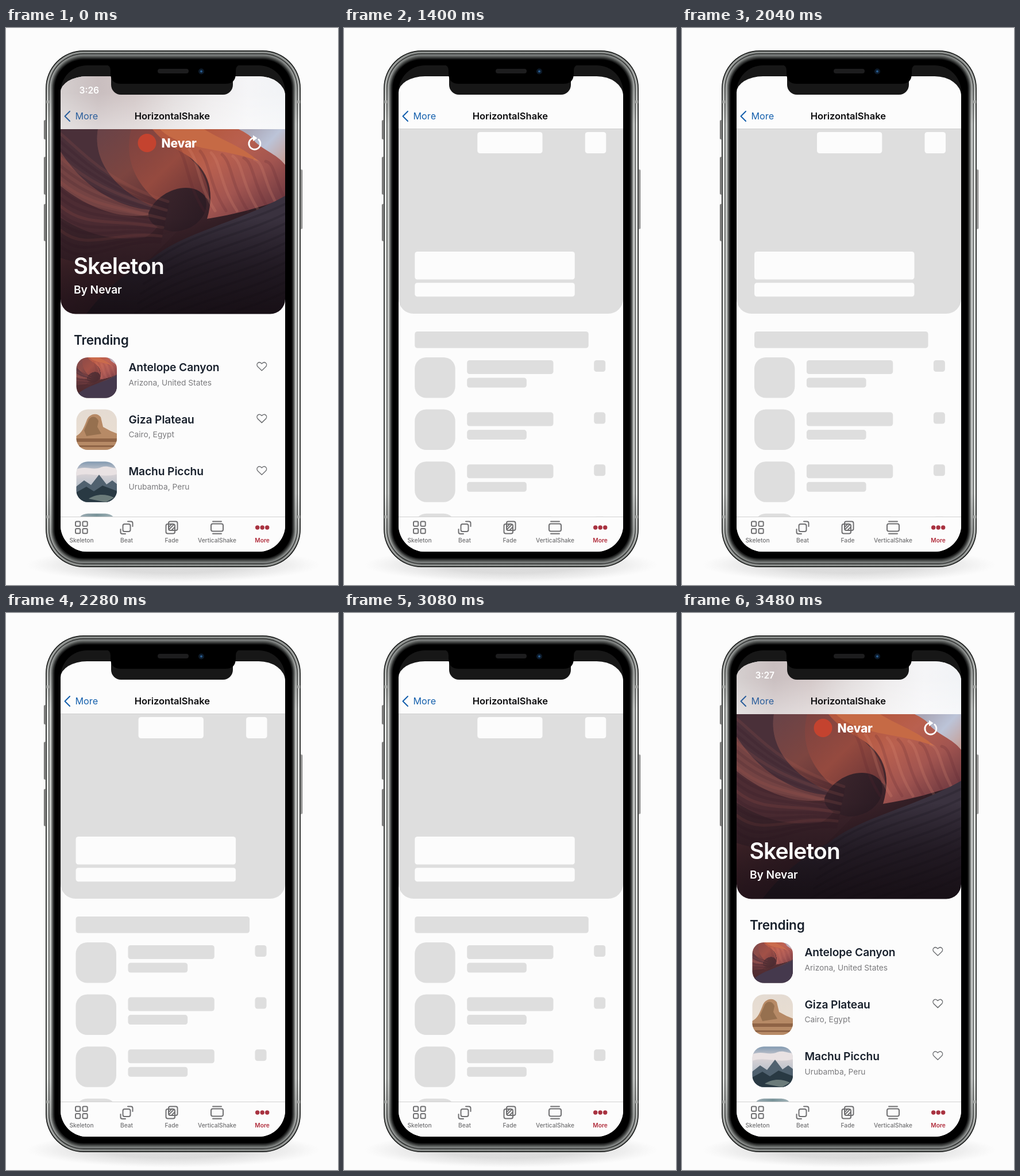
An HTML page with a canvas that plays this animation: 578x969 px, repeating every 6 s.

```html
<!DOCTYPE html>
<html lang="en">
<head>
<meta charset="utf-8">
<title>Horizontal shake</title>
<style>
html, body { margin: 0; width: 100%; height: 100%; overflow: hidden; background: #fcfcfc; }
canvas { display: block; width: 578px; height: 969px; }
</style>
</head>
<body>
<canvas id="stage" width="578" height="969"></canvas>
<script>
const W = 578, H = 969, LOOP = 6000;
const PAPER = '#fcfcfc', BONE = '#dedede', INK = '#18202c', GREY = '#707072';
const ROW = 90.6;
const stage = document.getElementById('stage').getContext('2d');
let c = stage;

function layer(draw) {
  const canvas = document.createElement('canvas');
  canvas.width = W;
  canvas.height = H;
  const prev = c;
  c = canvas.getContext('2d');
  draw();
  c = prev;
  return canvas;
}

function box(x, y, w, h, r, fill) {
  c.beginPath();
  c.roundRect(x, y, w, h, r);
  if (fill) { c.fillStyle = fill; c.fill(); }
}

function outline(x, y, w, h, r, color, width) {
  box(x, y, w, h, r);
  c.strokeStyle = color;
  c.lineWidth = width;
  c.stroke();
}

function dot(x, y, r, fill) {
  c.beginPath();
  c.arc(x, y, r, 0, 7);
  c.fillStyle = fill;
  c.fill();
}

function shape(d, fill) {
  c.fillStyle = fill;
  c.fill(new Path2D(d));
}

function line(d, color, width) {
  c.strokeStyle = color;
  c.lineWidth = width;
  c.lineCap = c.lineJoin = 'round';
  c.stroke(new Path2D(d));
}

function ramp(x0, y0, x1, y1, ...colors) {
  const g = c.createLinearGradient(x0, y0, x1, y1);
  colors.forEach((color, i) => g.addColorStop(i / (colors.length - 1), color));
  return g;
}

function text(str, x, y, size, weight, color, track = 0, align = 'left') {
  c.font = `${weight} ${size}px Inter, sans-serif`;
  c.letterSpacing = track + 'px';
  c.textAlign = align;
  c.fillStyle = color;
  c.fillText(str, x, y);
}

function clipped(x, y, w, h, r, draw) {
  c.save();
  box(x, y, w, h, r);
  c.clip();
  draw();
  c.restore();
}

// Phone body

function shadow() {
  c.save();
  c.translate(291, 934);
  c.scale(1, 0.12);
  const g = c.createRadialGradient(0, 0, 120, 0, 0, 256);
  g.addColorStop(0, 'rgba(90,90,90,.2)');
  g.addColorStop(0.6, 'rgba(120,120,120,.1)');
  g.addColorStop(1, 'rgba(160,160,160,0)');
  c.fillStyle = g;
  c.fillRect(-270, -270, 540, 540);
  c.restore();
}

function ring(inset, fill) {
  box(69 + inset, 39 + inset, 444 - 2 * inset, 899 - 2 * inset, 66 - inset, fill);
}

function shell() {
  c.fillStyle = PAPER;
  c.fillRect(0, 0, W, H);
  shadow();
  const metal = x => ramp(x, 0, x + 6, 0, '#333', '#d4d4d2', '#555');
  [[160, 34], [224, 66], [306, 65]].forEach(([y, h]) => box(66, y, 6, h, 2, metal(66)));
  box(510, 246, 6, 104, 2, metal(510));
  const sheen = (end, mid) => ramp(0, 39, 0, 938, end, mid, mid, mid, mid, mid, mid, end);
  ring(0, '#1b1d1c');
  ring(1.7, sheen('#8b8e8c', '#e2e4e2'));
  ring(5, sheen('#2a2c2b', '#535554'));
  ring(6.6, sheen('#747776', '#d0d2d0'));
  ring(9.4, sheen('#555856', '#8c8f8d'));
  ring(11.4, sheen('#3a3c3b', '#4a4c4b'));
  ring(13.4, '#1c1d1d');
  ring(15.4, '#000');
  for (const x of [70, 507]) {
    c.fillStyle = '#a8aaa8';
    c.fillRect(x, 126, 5, 5);
    c.fillRect(x, 848, 5, 5);
  }
  box(95, 65, 391, 846, 46, '#171717');
}

function notch() {
  box(183, 65, 212, 51, [0, 0, 17, 17], '#171717');
  shape('M174 64 Q182 65 182 74 V79 Q182 97 200 97 H382 Q400 97 400 79 V74 Q400 65 408 64 Z', '#000');
  box(264, 71, 54, 8, 4, '#1d1d1e');
  dot(340, 75.5, 5, '#0d1b2b');
  dot(340, 75.5, 2, '#285b8e');
}

// Photographs as simple shapes

function canyon() {
  c.fillStyle = ramp(95, 180, 300, 497, '#5c424b', '#633839', '#3a2229', '#20151b');
  c.fillRect(95, 176, 391, 322);
  // curved walls on the left
  shape('M95 176 H160 C150 235 195 290 275 318 C190 318 130 270 95 215 Z', '#4a3039');
  shape('M160 176 H228 C205 225 235 275 300 300 L275 318 C195 290 150 235 160 176 Z',
    ramp(165, 180, 270, 310, '#6a4347', '#7d4540', '#5a3034'));
  shape('M95 215 C130 270 190 318 275 318 C220 340 150 320 95 275 Z', '#744343');
  shape('M95 275 C150 320 215 335 270 330 C260 375 190 392 95 350 Z', '#4d2c33');
  shape('M95 330 C160 372 220 375 300 352 L250 402 C200 420 140 415 95 400 Z', '#3c242b');
  // red core and sunlit slab
  shape('M218 176 H262 C300 215 352 232 354 300 C322 272 285 285 262 300 C225 270 205 225 218 176 Z',
    ramp(225, 180, 340, 300, '#7e4340', '#954a3f', '#6b3537'));
  shape('M255 176 H430 C445 205 470 210 486 236 V296 C445 312 395 325 350 332 C366 280 350 240 306 216 C284 204 266 190 255 176 Z',
    ramp(330, 185, 440, 325, '#b4583e', '#b9604f', '#a25550', '#743c42'));
  shape('M268 176 H345 C375 195 410 205 440 232 C395 214 350 214 312 200 C292 194 278 186 268 176 Z', '#c66a45');
  shape('M405 176 H486 V238 C470 218 446 212 432 196 C425 186 415 181 405 176 Z',
    ramp(420, 180, 480, 235, '#a9a6b6', '#bcc4d8', '#c5a29c'));
  shape('M248 322 C262 284 320 262 346 292 C358 322 330 354 290 354 C266 350 246 340 248 322 Z',
    ramp(250, 290, 345, 350, '#3d262d', '#291a22'));
  for (let i = 0; i < 15; i++) {
    const y = 184 + i * 14;
    line(`M95 ${y} C140 ${y + 38} ${178 + i} ${268 + i * 7} ${282 - i} ${302 + i * 5}`,
      i % 3 ? 'rgba(36,18,28,.14)' : 'rgba(190,105,90,.13)', 5);
  }
  for (let i = 0; i < 9; i++) {
    const x = 300 + i * 19;
    line(`M${x} ${208 + i * 3} C${x + 18} 235 ${x + 14} 270 ${x + 45} 318`,
      i % 2 ? 'rgba(225,145,120,.2)' : 'rgba(90,35,45,.2)', 5);
  }
  // slate slope
  shape('M140 497 C185 440 220 420 255 400 C310 355 400 340 486 292 V498 Z',
    ramp(350, 330, 350, 490, '#3a323f', '#2b2530', '#1d181f'));
  for (let i = 0; i < 10; i++) {
    const y = 306 + i * 17;
    line(`M486 ${y} C410 ${y + 38} 320 ${y + 50} ${250 - i * 5} ${y + 105}`, 'rgba(12,8,16,.16)', 4);
  }
  c.fillStyle = ramp(0, 330, 0, 497, 'rgba(20,10,16,0)', 'rgba(20,10,16,.38)', 'rgba(20,10,16,.55)');
  c.fillRect(95, 176, 391, 322);
}

const canyonLayer = layer(canyon);

function thumbs() {
  clipped(122.5, 573, 70.5, 70.5, 20, () => {
    c.drawImage(canyonLayer, 165, 176, 321, 290, 122, 573, 72, 72);
    c.fillStyle = 'rgba(215,110,105,.2)';
    c.fillRect(122, 573, 72, 72);
    shape('M120 640 C145 618 172 618 196 602 V646 H120 Z', '#45394d');
  });
  clipped(122.5, 663.5, 70.5, 70.5, 20, () => {
    c.fillStyle = ramp(0, 663, 0, 734, '#e4dbd2', '#ecdfd1');
    c.fillRect(122, 663, 72, 72);
    shape('M122 710 C132 705 136 694 140 684 C143 672 158 667 165 677 L169 694 L182 701 L194 706 V735 H122 Z', '#b78a66');
    shape('M143 684 C146 674 158 674 161 684 L159 694 L166 706 L140 710 L136 700 Z', '#96704f');
    shape('M122 714 H194 V720 H122 Z M122 726 H194 V729 H122 Z', '#8f6446');
  });
  clipped(122.5, 754.2, 70.5, 70.5, 20, () => {
    c.fillStyle = ramp(0, 754, 0, 795, '#8199b0', '#d9d3d6', '#bcc2cb');
    c.fillRect(122, 754, 72, 72);
    shape('M122 768 C140 760 150 771 166 764 C178 760 188 768 194 765 V776 C166 784 145 771 122 779 Z', '#e9e2e3');
    shape('M122 798 L136 787 L148 795 L162 777 L175 794 L185 787 L194 794 V826 H122 Z', '#50616f');
    shape('M122 808 L140 798 L153 806 L168 796 L194 806 V826 H122 Z', '#293943');
    shape('M144 819 C157 810 174 810 188 817 L174 825 Z', '#6b7b7a');
  });
  box(122.5, 844.8, 70.5, 70.5, 20, ramp(123, 0, 193, 0, '#a4b1b8', '#789399', '#a8b8bd'));
}

// App screens

function heart(x, y) {
  line(`M${x} ${y + 7.5} L${x - 7} ${y + 0.8} C${x - 11} ${y - 4} ${x - 5} ${y - 10} ${x} ${y - 4.6} C${x + 5} ${y - 10} ${x + 11} ${y - 4} ${x + 7} ${y + 0.8} Z`, '#727477', 1.5);
}

function statusGlass() {
  c.fillStyle = ramp(95, 0, 486, 0, '#d5cfcf', '#c9bebf', '#d3c8c8', '#e2dddd', '#eeeced', '#f5f5f7', '#f1f3f6');
  c.fillRect(95, 84, 391, 92);
  c.fillStyle = ramp(0, 112, 0, 176, 'rgba(255,255,255,0)', 'rgba(255,255,255,.38)');
  c.fillRect(95, 112, 391, 64);
}

function loaded() {
  statusGlass();
  clipped(95, 176, 391, 321.6, [0, 0, 26, 26], () => c.drawImage(canyonLayer, 0, 0));
  dot(245.5, 200, 16, '#c4432f');
  text('Nevar', 270.5, 208, 21, 800, '#fff', -0.2);
  line('M439.8 194 A10 10 0 1 1 431.5 191.3', '#fff', 2.8);
  shape('M430 186.5 L437.5 191.5 L430 197 Z', '#fff');
  text('Skeleton', 117.5, 427.5, 39, 600, '#fff', -0.8);
  text('By Nevar', 118, 462, 19.2, 600, '#fff', -0.05);
  text('Trending', 118, 551, 22.5, 600, INK, -0.15);
  thumbs();
  [['Antelope Canyon', 'Arizona, United States'],
   ['Giza Plateau', 'Cairo, Egypt'],
   ['Machu Picchu', 'Urubamba, Peru']].forEach(([name, place], i) => {
    const y = i * ROW;
    text(name, 213.5, 597 + y, 19.2, 600, INK, -0.1);
    text(place, 213.5, 621.5 + y, 13.75, 400, '#7b7b7e');
    heart(445.3, 588.5 + y);
  });
}

function skeleton(hero, list) {
  box(95, 176, 391, 321, [0, 0, 26, 26], BONE);
  [[227.5, 181, 113.3, 37], [415, 181, 36.5, 37], [118.5, 389, 278.5, 48.5], [118.5, 443.3, 278.5, 24]]
    .forEach(([x, y, w, h]) => box(x + hero, y, w, h, 4.5, PAPER));
  box(118.5 + hero, 528, 302.5, 28.7, 4.5, BONE);
  for (let i = 0; i < 4; i++) {
    const y = 573 + i * ROW;
    box(123 + list, y, 70.5, 70.5, 20, BONE);
    box(214 + list, y + 5, 150.3, 24, 4.5, BONE);
    box(214 + list, y + 35.5, 103.7, 17, 4.5, BONE);
    box(435 + list, y + 5, 20, 20, 4.5, BONE);
  }
}

function navBar(isLoading) {
  const blue = isLoading ? '#1560ad' : '#2c5f9c';
  line('M111 145 L102.5 153.5 L111 162', blue, 2);
  text('More', 120.5, 159.3, 16.2, 400, blue);
  text('HorizontalShake', 289.3, 159.2, 16.5, 600, '#0c0c0e', 0, 'center');
  if (isLoading) {
    c.fillStyle = '#cfcfcf';
    c.fillRect(95, 175, 391, 1);
  }
}

function tabBar() {
  c.fillStyle = PAPER;
  c.fillRect(95, 850, 391, 62);
  c.fillStyle = '#d2d2d2';
  c.fillRect(95, 850, 391, 1);
  for (const x of [121, 133.5])
    for (const y of [858.5, 871]) outline(x, y, 8.2, 8.2, 2, GREY, 2);

  outline(203.5, 863, 13, 13, 3, GREY, 2);
  line('M212 858.5 H217.5 Q220.5 858.5 220.5 861.5 V867', GREY, 2);
  line('M199.5 872 V877 Q199.5 880 202.5 880 H208', GREY, 2);

  outline(283, 858.5, 15.5, 15.5, 3, GREY, 2);
  outline(278.5, 863, 15.5, 16.5, 3, GREY, 2);
  line('M284 872 L292 864 M284 867.5 L289 862.5 M288 874 L294 868', GREY, 1.8);

  outline(357, 862.5, 21, 13, 3, GREY, 2);
  line('M360 858.5 H375 M360 879.7 H375', GREY, 2);

  [437.7, 446.2, 454.7].forEach(x => dot(x, 869, 3.7, '#a83240'));
  [['Skeleton', 131.5], ['Beat', 210], ['Fade', 288.5], ['VerticalShake', 367.5]]
    .forEach(([label, x]) => text(label, x, 895, 10.2, 500, GREY, 0, 'center'));
  text('More', 446, 895, 10.2, 600, '#b02c3b', 0, 'center');
}

function screen(isLoading, content) {
  clipped(95, 65, 391, 846, 46, () => {
    box(95, 84, 391, 830, [{ x: 46, y: 28 }, { x: 46, y: 34 }, 0, 0], PAPER);
    c.clip();
    content();
    navBar(isLoading);
    tabBar();
  });
  notch();
}

const shellLayer = layer(shell);
const loadedLayer = layer(() => {
  c.drawImage(shellLayer, 0, 0);
  screen(false, loaded);
});

// Eased swing from 0 to 1 and back
function swing(t) {
  const p = ((t - 960) / 840) % 2;
  const u = p > 1 ? 2 - p : p;
  return u < 0.5 ? 2 * u * u : 1 - 2 * (1 - u) * (1 - u);
}

function frame(now) {
  const t = Math.floor((now % LOOP) / 40) * 40;
  if (t >= 1000 && t < 3120) {
    const list = t < 1080 ? 0 : -5 + 9.45 * swing(t);
    const hero = t < 1080 ? 0 : list + 4.6;
    c.drawImage(shellLayer, 0, 0);
    screen(true, () => skeleton(hero, list));
  } else {
    c.drawImage(loadedLayer, 0, 0);
    text(t >= 3480 ? '3:27' : '3:26', 127.5, 114.3, 15.6, 600, '#fff');
  }
}

const start = performance.now();
function tick() {
  frame(performance.now() - start);
  requestAnimationFrame(tick);
}
tick();
</script>
</body>
</html>
```
